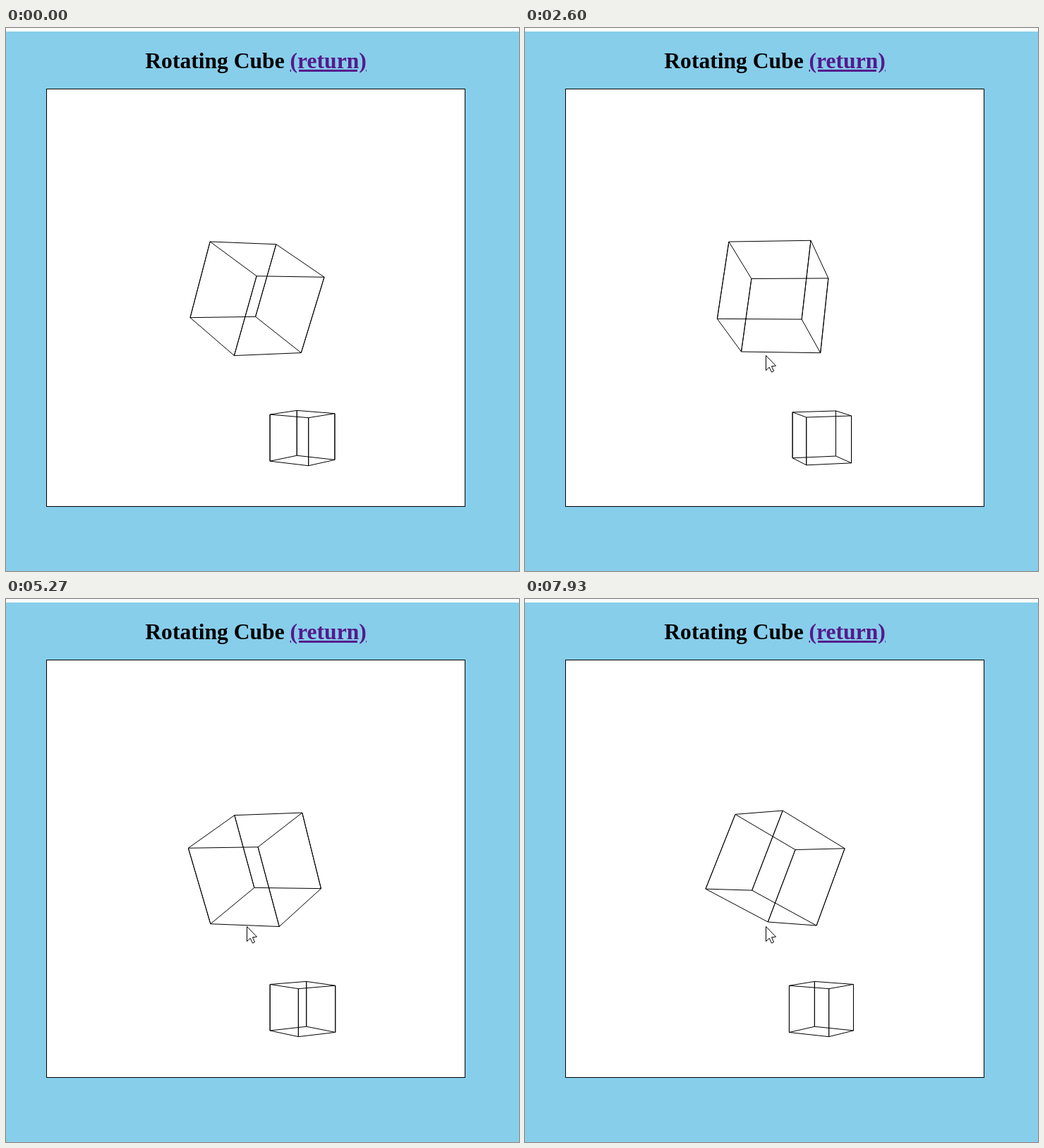
Animation of 727x770 px, one loop 8000 ms. Source, as an HTML page with a canvas:

```html
<!DOCTYPE html>
<html lang="en">
<head>
<meta charset="utf-8">
<title>Rotating Cube</title>
<style>
  html, body { margin: 0; width: 100%; height: 100%; overflow: hidden; }
  body { position: relative; background: #87ceeb; }
  .strip { position: absolute; left: 0; top: 0; width: 100%; height: 5px; background: #fafbfc; }
  h1 {
    position: absolute; left: 197.3px; top: 29px; margin: 0;
    font: bold 31.58px/35px "Liberation Serif", "Times New Roman", serif;
    color: #000; white-space: nowrap;
  }
  h1 span { color: #551a8b; text-decoration: underline; }
  .board {
    position: absolute; left: 57px; top: 86px; width: 594px; height: 593px;
    box-sizing: border-box; border: 1px solid #000; background: #fff;
  }
  canvas { position: absolute; left: 0; top: 0; }
</style>
</head>
<body>
<div class="strip"></div>
<h1>Rotating Cube <span>(return)</span></h1>
<div class="board"></div>
<canvas width="727" height="770"></canvas>
<script>
const ctx = document.querySelector('canvas').getContext('2d');
const LOOP = 8000, START = 470, STEP = 200 / 3;
const EYE = { x: 354.3, y: 382.5, distance: 1475 };
const RAD = Math.PI / 180;

const bigCube = { x: 0, y: 0, size: 118.6, tilt: 25 * RAD };
const smallCube = { x: 65.9, y: 197.8, size: 65.9, tilt: 0 };
const arrow = new Path2D('M0 0V21L4.7 16.6L8 23.5L11 22L8 15.2L14 14.6Z');

function project(cube, turn, sx, sy, sz) {
  const h = cube.size / 2;
  const c = Math.cos(cube.tilt), s = Math.sin(cube.tilt);
  const x = h * (sx * c - sy * s);
  const y = h * (sx * s + sy * c);
  const z = h * sz;
  const depth = z * Math.cos(turn) - x * Math.sin(turn);
  const scale = EYE.distance / (EYE.distance - depth);
  return [
    EYE.x + scale * (cube.x + x * Math.cos(turn) + z * Math.sin(turn)),
    EYE.y + scale * (cube.y + y)
  ];
}

// Four closed side faces, so the upright edges are stroked twice.
function drawCube(cube, turn) {
  const corners = [[-1, -1], [1, -1], [1, 1], [-1, 1]];
  corners.forEach(([ax, az], i) => {
    const [bx, bz] = corners[(i + 1) % 4];
    const face = [[ax, -1, az], [bx, -1, bz], [bx, 1, bz], [ax, 1, az]];
    ctx.beginPath();
    face.forEach(p => ctx.lineTo(...project(cube, turn, ...p)));
    ctx.closePath();
    ctx.stroke();
  });
}

function drawPointer(time) {
  const p = Math.min(1, Math.max(0, (time - 1540) / 600));
  const ease = p * p * (3 - 2 * p);
  ctx.save();
  ctx.translate(Math.round(365 - 23 * ease) - 0.5, Math.round(455 + 10 * ease) - 0.5);
  ctx.fillStyle = '#fff';
  ctx.fill(arrow);
  ctx.stroke(arrow);
  ctx.restore();
}

function draw(time) {
  // Steps fall on 10 ms marks, up to 7 ms ahead of an even beat.
  const step = time < START ? 0 : Math.floor((time - START + 8) / STEP) + 1;
  const turn = Math.max(-52.6 * RAD, 9.95 * RAD + 0.07 * (step - 17));
  ctx.clearRect(0, 0, 727, 770);
  ctx.strokeStyle = '#000';
  ctx.lineWidth = 1;
  drawCube(bigCube, turn);
  drawCube(smallCube, -turn);
  if (step > 0) drawPointer(time);
}

const begin = performance.now();
function tick() {
  draw((performance.now() - begin) % LOOP);
  requestAnimationFrame(tick);
}
tick();
</script>
</body>
</html>
```
